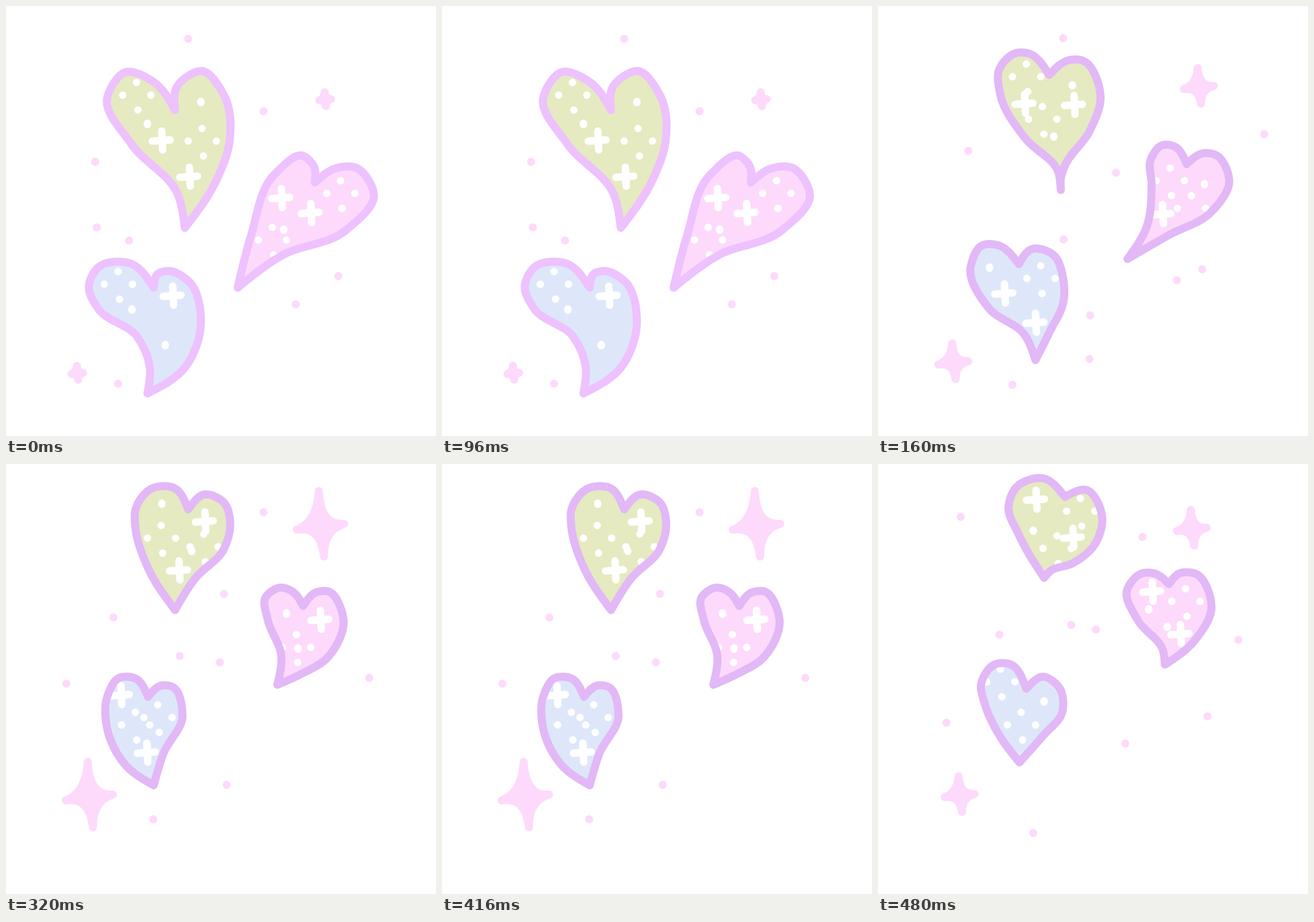
Write an HTML page that moves like this. It is 748x748 px and loops after 0.64 s.

```html
<!DOCTYPE html>
<html lang="en">
<head>
<meta charset="utf-8">
<title>Floating hearts</title>
<style>
  html, body { margin: 0; width: 100%; height: 100%; overflow: hidden; background: #fff; }
  svg { display: block; width: 100%; height: 100%; }
</style>
</head>
<body>
<svg id="stage" viewBox="0 0 748 748" stroke-linecap="round" stroke-linejoin="round"></svg>
<script>
const HOLD = 160;
const GREEN = '#e5eac1', PINK = '#fddafb', BLUE = '#dee7fa';
const LILAC = '#e2b8f7', BRIGHT = '#eec1ff';

// Heart: key points from notch down the right side / from tip up the left side.
// Marks: D = diamond of four dots, O = single dot, P = plus.
// Star: centre x, y, half width, half height; twin is the second star's offset.
const poses = [
  {
    line: BRIGHT,
    hearts: [
      [GREEN, '294 181 296 143 341 113 380 157 389 235 366 303 / 311 386 299 328 218 240 176 160 208 115 258 133',
        'D 227 133 D 341 213 O 246 205 O 339 167 P 270 234 P 318 297'],
      [PINK, '537 307 575 282 608 281 640 328 590 391 480 434 / 403 490 426 400 467 293 518 261 536 280',
        'D 582 304 D 463 385 O 483 389 P 478 334 P 529 360'],
      [BLUE, '257 490 264 466 280 461 318 479 339 550 312 628 / 246 674 250 628 228 575 160 526 144 488 160 455 217 448',
        'D 195 462 O 219 528 O 277 590 P 289 504']
    ],
    dots: '317 57 448 183 155 271 158 385 214 408 578 470 504 519 195 657',
    star: [555, 162, 10, 12], twin: [-431, 476]
  },
  {
    line: LILAC,
    hearts: [
      [GREEN, '298 120 333 94 353 94 387 155 368 218 325 278 318 300 / 318 320 314 290 256 230 213 155 211 110 240 82 260 82',
        'D 258 101 D 286 175 O 306 227 O 338 138 P 254 170 P 340 172'],
      [PINK, '537 275 567 256 585 258 611 305 580 358 505 399 / 434 440 467 385 476 310 474 268 495 242 515 244',
        'D 508 282 D 545 330 O 568 310 P 494 362'],
      [BLUE, '245 449 267 423 304 432 323 480 323 512 297 570 / 274 616 255 572 193 526 161 455 182 416 208 416',
        'D 283 452 O 194 455 P 219 500 P 273 551']
    ],
    dots: '322 56 672 223 157 252 414 290 323 406 564 458 520 477 369 538 368 614 234 659',
    star: [558, 139, 26, 31], twin: [-427, 479]
  },
  {
    line: LILAC,
    hearts: [
      [GREEN, '317 79 345 53 379 67 390 105 379 148 329 199 / 294 254 248 183 225 110 225 80 255 42 293 42',
        'D 270 107 D 344 122 O 271 69 O 323 151 P 345 100 P 300 185'],
      [PINK, '517 247 540 223 558 221 587 270 560 336 510 367 / 472 384 479 335 455 270 451 233 478 215 497 221',
        'D 505 297 O 488 260 O 508 321 P 546 271'],
      [BLUE, '247 405 272 385 288 387 307 438 274 503 / 257 559 209 525 175 455 176 405 197 372 225 373',
        'D 264 419 D 225 432 P 199 402 P 244 502']
    ],
    dots: '448 84 379 226 187 267 302 334 372 345 105 382 632 372 384 558 256 618',
    star: [547, 104, 41, 57], twin: [-402, 471]
  },
  {
    line: LILAC,
    hearts: [
      [GREEN, '325 57 362 45 390 93 380 135 338 173 300 186 / 289 198 245 123 227 75 240 41 288 25',
        'D 352 60 D 311 125 O 270 116 P 274 62 P 338 128'],
      [PINK, '506 209 525 190 550 190 580 250 550 308 / 499 349 496 325 452 272 433 220 460 190 480 190',
        'D 535 217 O 471 253 O 503 283 P 476 222 P 525 296'],
      [BLUE, '258 391 287 370 316 390 321 430 285 475 / 246 519 213 475 185 415 179 385 205 348 229 348',
        'D 213 357 D 249 432 O 289 413']
    ],
    dots: '144 92 460 127 336 280 379 288 211 297 627 306 573 439 119 450 430 486 270 642',
    star: [546, 111, 26, 31], twin: [-404, 463]
  }
];

function points(text) {
  const n = text.trim().split(' ').map(Number), out = [];
  for (let i = 0; i < n.length; i += 2) out.push([n[i], n[i + 1]]);
  return out;
}

const mix = (a, b, f) => a.map((v, k) => f(v, b[k]));

// Smooth curve whose tangents weigh neighbouring chords by their length
function curve(pts) {
  const last = pts.length - 1;
  const len = [], dir = [], tan = [];
  for (let i = 0; i < last; i++) {
    const d = mix(pts[i + 1], pts[i], (a, b) => a - b);
    len[i] = Math.hypot(...d);
    dir[i] = d.map(v => v / len[i]);
  }
  for (let i = 1; i < last; i++) {
    const w = len[i] / (len[i - 1] + len[i]);
    tan[i] = mix(dir[i - 1], dir[i], (a, b) => a * w + b * (1 - w));
  }
  const end = (d, t) => mix(d, t, (a, b) => (3 * a - b) / 2);
  tan[0] = end(dir[0], tan[1]);
  tan[last] = end(dir[last - 1], tan[last - 1]);
  return len.map((l, i) => {
    const c1 = mix(pts[i], tan[i], (p, t) => p + t * l / 3);
    const c2 = mix(pts[i + 1], tan[i + 1], (p, t) => p - t * l / 3);
    return `C${c1} ${c2} ${pts[i + 1]}`;
  }).join('');
}

const oval = (x, y, rx, ry, fill) =>
  `<ellipse cx="${x}" cy="${y}" rx="${rx}" ry="${ry}" fill="${fill}"/>`;

const mark = {
  D: (x, y) => [[0, 0], [-24, 22], [25, 22], [2.5, 48]]
    .map(([dx, dy]) => oval(x + dx, y + dy, 6.5, 6.5, '#fff')).join(''),
  O: (x, y) => oval(x, y, 6.7, 7.6, '#fff'),
  P: (x, y) => `<path d="M${x + 1} ${y - 16.5}l1.5 33M${x - 15.5} ${y + 1}l31 -2"
    stroke="#fff" stroke-width="13" fill="none"/>`
};

function heart([fill, outline, marks], line) {
  const [right, left] = outline.split('/').map(points);
  const d = `M${right[0]}${curve([...right, left[0]])}${curve([...left, right[0]])}Z`;
  const decor = marks.replace(/([DOP]) (\S+) (\S+)/g, (_, kind, x, y) => mark[kind](+x, +y));
  return `<path d="${d}" fill="${fill}"/>${decor}
    <path d="${d}" fill="none" stroke="${line}" stroke-width="14"/>`;
}

// Four slightly skewed tips; two opposite sides are a little fuller
function sparkle([x, y, w, h], [dx, dy] = [0, 0]) {
  const at = (u, v) => [x + dx + u * w, y + dy + v * h];
  const top = at(-0.07, -1), right = at(1, 0), bottom = at(0.15, 1), left = at(-1, 0.18);
  const waist = at(0, 0.06);
  const d = `M${top}Q${waist} ${right}Q${at(0.14, 0.18)} ${bottom}Q${waist} ${left}Q${at(-0.14, -0.06)} ${top}Z`;
  return `<path d="${d}" fill="${PINK}" stroke="${PINK}" stroke-width="14"/>`;
}

const draw = ({ line, hearts, dots, star, twin }) => '<g>' +
  points(dots).map(([x, y]) => oval(x, y, 7, 7, PINK)).join('') +
  sparkle(star) + sparkle(star, twin) +
  hearts.map(h => heart(h, line)).join('') + '</g>';

const stage = document.getElementById('stage');
stage.innerHTML = poses.map(draw).join('');
const layers = [...stage.children];

function render(ms) {
  const now = Math.floor(ms / HOLD) % layers.length;
  layers.forEach((g, i) => g.setAttribute('visibility', i === now ? 'visible' : 'hidden'));
}

const start = performance.now();
function tick() {
  render(performance.now() - start);
  requestAnimationFrame(tick);
}
tick();
</script>
</body>
</html>
```
